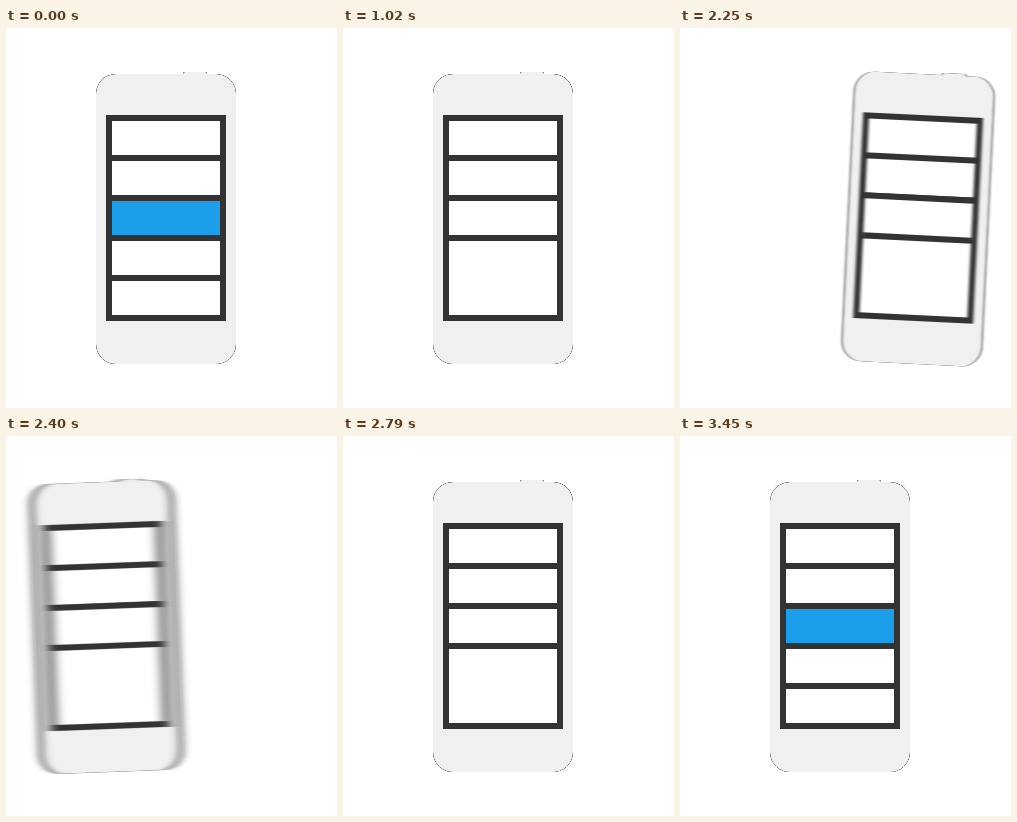
Animation of 331x380 px, one loop 4200 ms. Source, as an HTML page:

```html
<!DOCTYPE html>
<html lang="en">
<head>
<meta charset="utf-8">
<title>Shake to undo</title>
<style>
  html, body { margin: 0; width: 100%; height: 100%; overflow: hidden; background: #fff; }
  svg { display: block; width: 100vw; height: 100vh; }
  .row { stroke: #333; stroke-width: 6; }
</style>
</head>
<body>
<svg viewBox="0 0 331 380">
  <defs>
    <!-- Sideways motion blur with a dark fringe wherever the edge is translucent -->
    <filter id="smear" filterUnits="userSpaceOnUse" x="-120" y="0" width="580" height="380" color-interpolation-filters="sRGB">
      <feGaussianBlur id="blur" in="SourceGraphic" stdDeviation="0 0" result="soft"/>
      <feComponentTransfer in="soft" result="fringe">
        <feFuncR type="table" tableValues="0 0"/>
        <feFuncG type="table" tableValues="0 0"/>
        <feFuncB type="table" tableValues="0 0"/>
        <feFuncA id="edge" type="table" tableValues="0 0"/>
      </feComponentTransfer>
      <feMerge>
        <feMergeNode in="soft"/>
        <feMergeNode in="fringe"/>
      </feMerge>
    </filter>
    <clipPath id="screen"><rect x="106" y="93" width="108" height="194"/></clipPath>
  </defs>
  <rect width="331" height="380" fill="#fff"/>
  <g filter="url(#smear)">
    <g id="phone">
      <path d="M177 47V46q0-2 2-2h20q2 0 2 2v1z" fill="#f0f0f0"/>
      <rect x="90" y="46" width="140" height="290" rx="20" fill="#f0f0f0"/>
      <rect x="103" y="90" width="114" height="200" fill="#fff" class="row"/>
      <path d="M103 130H217M103 170H217" class="row"/>
      <g clip-path="url(#screen)">
        <g id="item">
          <rect x="103" y="170" width="114" height="40" fill="#1b9fea" class="row"/>
          <circle id="touch" cx="160" cy="190" r="12.3" fill="#333"/>
        </g>
        <rect id="next" x="103" y="210" width="114" height="40" fill="#fff" class="row"/>
      </g>
    </g>
  </g>
</svg>
<script>
  const LOOP = 4200, STEP = 30, SWING = 80, ROW = 40, EXIT = 114;
  const $ = id => document.getElementById(id);
  const phone = $('phone'), item = $('item'), touch = $('touch'), next = $('next');

  const span = (t, a, b) => Math.min(1, Math.max(0, (t - a) / (b - a)));
  const sine = p => (1 - Math.cos(Math.PI * p)) / 2;
  const inQuad = p => p * p;
  const outQuad = p => 1 - (1 - p) ** 2;
  const outBack = (p, s = 1.85) => 1 + (s + 1) * (p - 1) ** 3 + s * (p - 1) ** 2;

  // Right, left, back to the middle
  const shake = t => SWING * (
    sine(span(t, 2040, 2235)) -
    2 * sine(span(t, 2235, 2450)) +
    sine(span(t, 2450, 2760)));

  function drawTouch(t) {
    const p = span(t, 30, 180);
    touch.setAttribute('r', 18.2 - 5.9 * p);
    touch.setAttribute('opacity', t < 1020 ? p : 0);
  }

  function drawRows(t) {
    const out = inQuad(span(t, 510, 780)) - outQuad(span(t, 3240, 3450));
    const up = outBack(span(t, 780, 1020)) - sine(span(t, 3060, 3255));
    item.setAttribute('transform', `translate(${EXIT * out} 0)`);
    next.setAttribute('transform', `translate(0 ${-ROW * up})`);
  }

  function drawPhone(t) {
    const x = shake(t);
    const speed = t > 2040 ? Math.abs(shake(t + 15) - shake(t - 15)) : 0;
    const peak = speed > 0.01 ? 0.27 : 0.5;
    phone.setAttribute('transform', `translate(${x} 0) rotate(${x * 0.036} 160 191)`);
    $('blur').setAttribute('stdDeviation', `${speed * 0.24} 0`);
    $('edge').setAttribute('tableValues', `0 ${peak * 0.75} ${peak} ${peak * 0.75} 0`);
  }

  function render() {
    const t = Math.floor(performance.now() % LOOP / STEP) * STEP;
    drawTouch(t);
    drawRows(t);
    drawPhone(t);
    requestAnimationFrame(render);
  }
  render();
</script>
</body>
</html>
```
